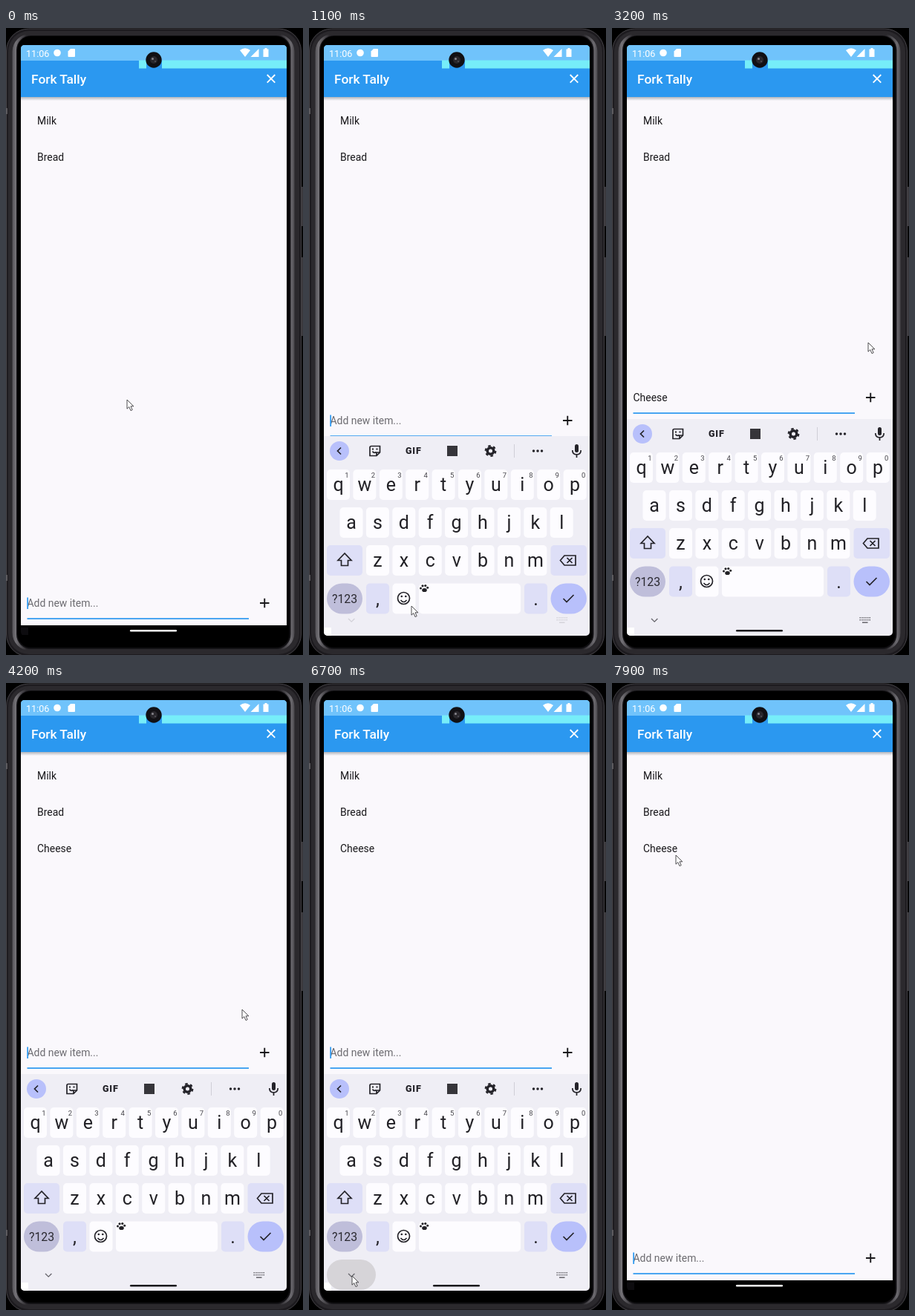
An HTML page that plays this animation: 400 px wide and 845 px high, repeating every 8 s.

```html
<!DOCTYPE html>
<html lang="en">
<head>
<meta charset="utf-8">
<title>Shopping list</title>
<style>
  html, body { margin: 0; width: 100%; height: 100%; overflow: hidden; background: #000; }
  svg { display: block; width: 400px; height: 845px; font-family: Roboto, sans-serif; }
  .line { fill: none; stroke: #242329; stroke-width: 1.7; }
  .item { font-size: 13.94px; fill: #1a191c; }
  .key { font-size: 25px; fill: #222126; text-anchor: middle; }
  .hint { font-size: 9.5px; fill: #45444a; text-anchor: middle; }
</style>
</head>
<body>
<svg viewBox="0 0 400 845">
  <defs>
    <clipPath id="screen"><rect x="20" y="23" width="358" height="796" rx="5"/></clipPath>
    <linearGradient id="shade" x2="0" y2="1">
      <stop stop-color="#8d9299" stop-opacity=".65"/>
      <stop offset="1" stop-color="#8d9299" stop-opacity="0"/>
    </linearGradient>
    <linearGradient id="rim" x2="1" y2="0">
      <stop stop-color="#555358"/><stop offset=".012" stop-color="#747277"/>
      <stop offset=".05" stop-color="#2b292d"/><stop offset=".95" stop-color="#2b292d"/>
      <stop offset=".988" stop-color="#6d6b70"/><stop offset="1" stop-color="#4a484d"/>
    </linearGradient>
  </defs>

  <!-- phone body -->
  <rect width="400" height="845"/>
  <path d="M399 214v53M399 309v106" stroke="#3c3a3e" stroke-width="2"/>
  <rect x=".5" y="1" width="397" height="846" rx="30" fill="#1d1b1f" stroke="#454347"/>
  <rect x="3" y="4" width="392" height="840" rx="28" fill="#2b292d"/>
  <path d="M1 108v8M1 737v8" stroke="#5c5a5e" stroke-width="2"/>
  <rect x="8.500" y="8" width="380" height="831" rx="24" fill="url(#rim)"/>
  <rect x="14" y="10" width="369.500" height="827" rx="20" fill="#121114"/>
  <rect x="15.500" y="11" width="366" height="824" rx="18"/>

  <g clip-path="url(#screen)">
    <rect x="20" y="23" width="358" height="782" fill="#faf8fc"/>
    <rect x="20" y="93" width="358" height="5" fill="url(#shade)"/>
    <rect x="20" y="23" width="358" height="70" fill="#2b98f0"/>
    <rect x="20" y="23" width="358" height="21" fill="#70c3fb"/>
    <path d="M179 43.500h10v11h-10zM210 43.500h168v11h-168z" fill="#76edf9"/>
    <text x="27" y="38.500" font-size="12.600" fill="#fff">11:06</text>
    <g fill="#fff">
      <circle cx="69" cy="33.500" r="4.800"/>
      <path d="M87 28h5q1 0 1 1v9q0 1-1 1h-7.500q-1 0-1-1v-6.500z"/>
      <path d="M315 30q7-5.500 14 0l-7 9z"/>
      <path d="M340.500 28v11h-11z"/>
      <path d="M348.500 28.500v-1.500h3v1.500h2v10.500h-7v-10.500z"/>
    </g>
    <text x="34" y="74.500" font-size="17.400" font-weight="500" fill="#fff">Fork Tally</text>
    <path d="M351.700 63l10.600 10.600m0-10.600l-10.600 10.600" stroke="#fff" stroke-width="1.800"/>

    <g class="item">
      <text x="42" y="130">Milk</text>
      <text x="42" y="179">Bread</text>
      <text x="42" y="228" id="added">Cheese</text>
    </g>

    <g id="field">
      <text id="prompt" class="item" x="28.500" y="503" style="fill:#6c6b70">Add new item...</text>
      <text id="typed" class="item" x="28.500" y="503"></text>
      <rect id="caret" y="490.500" width="1.700" height="15.500" fill="#2b98f0"/>
      <rect x="28.500" y="518.200" width="298.500" height="1.700" fill="#2b98f0"/>
      <path d="M342 498h12.500m-6.250-6.250v12.500" stroke="#19181b" stroke-width="1.900"/>
    </g>

    <rect x="20" y="805" width="358" height="15"/>
    <rect x="20" y="808" width="10" height="10" fill="#0d0c0f"/>
    <rect x="167" y="811" width="63" height="2.400" rx="1.200" fill="#fff"/>

    <g id="keyboard">
      <rect x="20" y="527" width="358" height="400" fill="#efeef5"/>
      <circle cx="41" cy="547" r="13" fill="#b8c0fb"/>
      <path class="line" d="M43 542.500l-4.500 4.500 4.500 4.500"/>
      <path class="line" d="M84 540.500h11.500v8.500l-4.500 4.500h-9v-11q0-2 2-2zM91 553v-4h4.500M85.500 547.500q2 3 5 1"/>
      <path d="M85 543.500h2v2h-2zM90.500 543.500h2v2h-2z" fill="#242329"/>
      <text x="130" y="551" font-size="12.500" font-weight="900" letter-spacing=".8" fill="#242329">GIF</text>
      <rect x="186" y="540" width="14" height="14" fill="#36353a"/>
      <circle cx="244.500" cy="547" r="4.300" fill="none" stroke="#242329" stroke-width="3.600"/>
      <circle cx="244.500" cy="547" r="6.800" fill="none" stroke="#242329" stroke-width="2.200" stroke-dasharray="3.560"/>
      <path d="M276.500 538v18" stroke="#cfced6"/>
      <path d="M302.500 547h.01m5.500 0h.01m5.500 0h.01" stroke="#242329" stroke-width="3.500" stroke-linecap="round"/>
      <rect x="358" y="538" width="5" height="11" rx="2.500" fill="#242329"/>
      <path class="line" d="M354.800 546q0 5.800 5.700 5.800t5.700-5.800M360.500 552v4"/>
      <g id="keys"></g>
      <path class="line" d="M48 685l-9 9.500h4.500v7h9v-7h4.500z"/>
      <path class="line" d="M338.500 694.500l5.500-6.500h15v13h-15zM347.500 691l7 7m0-7l-7 7"/>
      <text x="48" y="752" font-size="15.800" fill="#2a2930" text-anchor="middle">?123</text>
      <circle class="line" cx="127.500" cy="745.500" r="8"/>
      <path class="line" d="M123.500 748q4 5 8 0"/>
      <path d="M124.800 743h.01m5.500 0h.01" stroke="#242329" stroke-width="2.600" stroke-linecap="round"/>
      <g fill="#222126">
        <ellipse cx="155.500" cy="734.500" rx="3.300" ry="2.600"/>
        <circle cx="150.500" cy="732" r="1.500"/><circle cx="153" cy="728.800" r="1.600"/>
        <circle cx="156.800" cy="728.500" r="1.600"/><circle cx="159.700" cy="731.200" r="1.500"/>
      </g>
      <path class="line" d="M342.500 746l4.500 4.500 9.500-9.500"/>
    </g>

    <rect id="corner" x="20" y="808" width="10" height="11" fill="#fff"/>
    <rect id="ripple" x="24" y="777" width="66" height="41" rx="20.500" fill="#d6d4d8"/>
    <g id="nav">
      <path d="M53 796l4.200 4.200 4.200-4.200" fill="none" stroke="#66656b" stroke-width="1.300"/>
      <path d="M333.500 794.800h14.500m-14.500 3h14.500" stroke="#66656b" stroke-width="1.600" stroke-dasharray="1.500 1.100"/>
      <path d="M337 801.300h7.500" stroke="#66656b" stroke-width="1.400"/>
      <rect id="handle" x="167" y="811" width="63" height="2.400" rx="1.200" fill="#19181b"/>
    </g>
  </g>

  <circle cx="199" cy="43" r="10.700" fill="#111014"/>
  <circle cx="199" cy="43" r="5" fill="#29272c"/>
  <circle cx="197.500" cy="41.500" r="1.500" fill="#8a888e"/>
  <circle cx="201" cy="45" r="1" fill="#55535a"/>
  <path id="pointer" d="M0 0v12.200l2.800-2.600 2.200 5 2.200-1-2.200-4.800h3.900z" fill="#fff" stroke="#3b3a3e" stroke-width=".9"/>
</svg>

<script>
const LOOP = 8000, TICK = 100;
const el = id => document.getElementById(id);

function key(x, y, w, fill = '#fdfcff', r = 5) {
  return `<rect x="${x}" y="${y}" width="${w}" height="41" rx="${r}" fill="${fill}"/>`;
}

function letters(row, firstX, y, numbered) {
  return [...row].map((c, i) => {
    const x = firstX + i * 35.4;
    const hint = numbered ? `<text class="hint" x="${x + 11.5}" y="${y + 11}">${(i + 1) % 10}</text>` : '';
    return key(x - 15.5, y, 31) + `<text class="key" x="${x}" y="${y + 28.5}">${c}</text>` + hint;
  }).join('');
}

const pale = '#dedff7';
el('keys').innerHTML =
  letters('qwertyuiop', 39.5, 572, true) +
  letters('asdfghjkl', 57, 623) +
  letters('zxcvbnm', 92.5, 674) +
  key(24, 674, 48, pale) + key(325.5, 674, 48.5, pale) +
  key(24, 725.5, 48, '#bfbeda', 20.5) + key(77, 725.5, 31, pale) +
  key(112.5, 725.5, 31) + key(148, 725.5, 137) + key(290, 725.5, 31, pale) +
  key(325.5, 725.5, 48.5, '#b8c0fb', 20.5) +
  '<text class="key" x="92.5" y="755">,</text><text class="key" x="305.5" y="755">.</text>';

// Rows are [time, ...values].
const pointerPath = [
  [0, 163, 501], [200, 160, 540], [500, 145, 700], [800, 138, 779], [2900, 138, 779],
  [3000, 200, 670], [3100, 305, 490], [3200, 345, 424], [3300, 350, 445], [3500, 349, 495],
  [4000, 349, 495], [4200, 318, 440], [4400, 300, 400], [4700, 284, 375], [4900, 284, 375],
  [5100, 262, 312], [5300, 238, 425], [5400, 225, 477], [5500, 216, 491], [5600, 216, 491],
  [5800, 170, 640], [6100, 90, 832], [6500, 58, 799], [7100, 58, 799],
  [7300, 68, 640], [7600, 84, 320], [7800, 86, 232]
];
const keyboardDrop = [
  [900, 295], [1000, 130], [1100, 23], [1200, 0],
  [6800, 0], [6900, 35], [7000, 140], [7100, 250], [7200, 295]
];
const fieldDrop = [
  [900, 277], [1000, 155], [1100, 31], [1200, 0],
  [6800, 0], [6900, 30], [7000, 135], [7100, 240], [7200, 277]
];
const navFade = [[1000, 0], [1100, .2], [1300, .5], [1900, 1], [6800, 1], [7000, 0]];
const handleFade = [[1100, 0], [1300, .35], [1900, 1]];
const rippleFade = [[6600, 0], [6700, 1], [6800, .9], [7100, 0]];
const typing = [
  [0, ''], [1300, 'C'], [1600, 'Ch'], [1700, 'Che'], [2300, 'Chee'],
  [2700, 'Chees'], [2800, 'Cheese'], [3900, '']
];
const blinks = [300, 800, 3200, 3700, 4400, 5000, 5400, 5900, 6400, 6700, 7000, 7500];

function tween(track, t) {
  const next = track.findIndex(row => row[0] > t);
  if (next <= 0) return track.at(next).slice(1);
  const a = track[next - 1], b = track[next];
  const p = (t - a[0]) / (b[0] - a[0]);
  return a.slice(1).map((v, i) => v + (b[i + 1] - v) * p);
}

const shift = (id, x, y) => el(id).setAttribute('transform', `translate(${x} ${y})`);
const fade = (id, value) => el(id).setAttribute('opacity', value);

function render(t) {
  const word = typing.findLast(row => row[0] <= t)[1];
  const [drop] = tween(keyboardDrop, t);
  el('typed').textContent = word;
  fade('prompt', word ? 0 : 1);
  fade('added', t >= 3900 ? 1 : 0);
  el('caret').setAttribute('x', 28.3 + (word ? el('typed').getComputedTextLength() : 0));
  fade('caret', blinks.filter(b => b <= t).length % 2 ? 0 : 1);
  shift('field', 0, tween(fieldDrop, t)[0]);
  shift('keyboard', 0, drop);
  fade('corner', drop < 280 ? 1 : 0);
  fade('nav', tween(navFade, t)[0]);
  fade('handle', tween(handleFade, t)[0]);
  fade('ripple', tween(rippleFade, t)[0]);
  shift('pointer', ...tween(pointerPath, t));
}

function frame() {
  render(Math.floor(performance.now() % LOOP / TICK) * TICK);
  requestAnimationFrame(frame);
}
frame();
</script>
</body>
</html>
```
